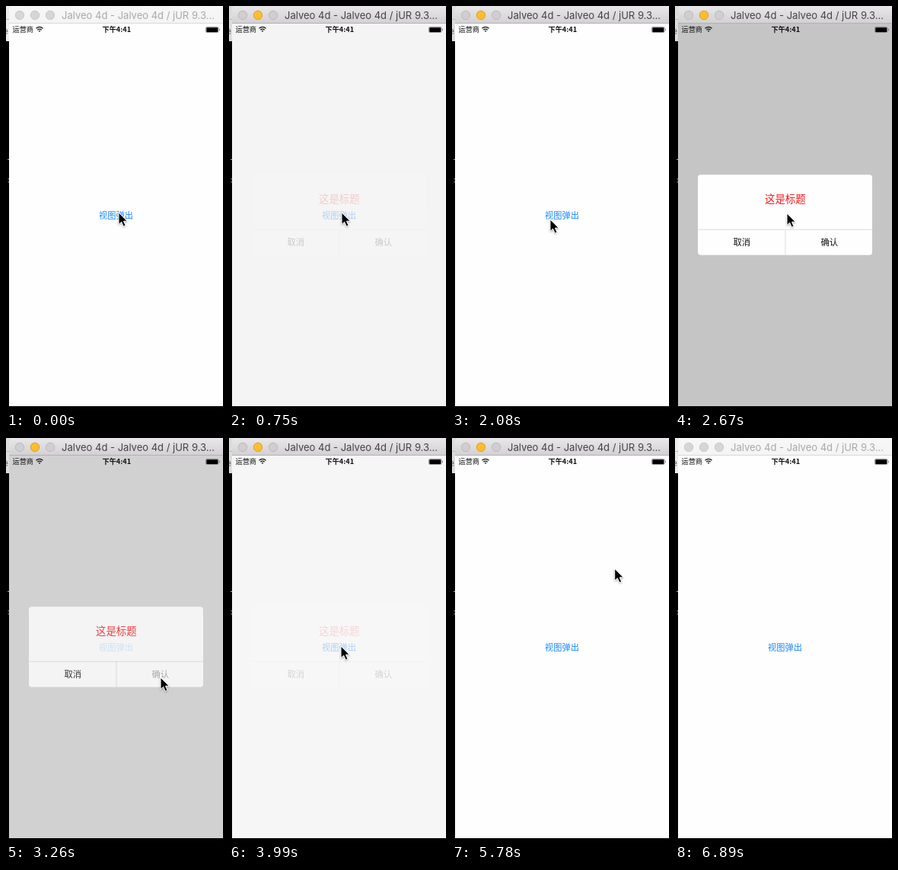
Write an HTML page that moves like this. It is 285 px wide and 528 px high and loops after 6.99 s.

```html
<!DOCTYPE html>
<html lang="zh-CN">
<head>
<meta charset="utf-8">
<title>Dialog demo</title>
<style>
  html, body { margin: 0; width: 100%; height: 100%; overflow: hidden; background: #000; }
  svg { display: block; width: 285px; height: 528px; }
  text { font-family: "Noto Sans CJK SC", "Noto Sans CJK", "Noto Sans", sans-serif; }
  .mid { text-anchor: middle; }
  .bar-title { font: 13px Inter, "Liberation Sans", sans-serif; }
  #win { --bar1: #f7f7f7; --bar2: #f4f4f4; --edge: #d9d9d9; --ink: #a9a9a9;
         --light: #d6d6d6; --ring: #c9c9c9; --mini: #d6d6d6; --mini-ring: #c9c9c9; --side: #ececec; }
  #win.active { --bar1: #e9e7e9; --bar2: #d2d0d2; --edge: #b4b2b4; --ink: #454345;
         --light: #d0ced0; --ring: #bbb9bb; --mini: #fdbd2e; --mini-ring: #e0a024; --side: #dcdcdc; }
  #top { stop-color: var(--bar1); }
  #bottom { stop-color: var(--bar2); }
  .lamp { fill: var(--light); stroke: var(--ring); }
  .mini { fill: var(--mini); stroke: var(--mini-ring); }
</style>
</head>
<body>
<svg viewBox="0 0 285 528">
  <filter id="soft" x="-50%" y="-50%" width="200%" height="200%">
    <feDropShadow dx="0" dy="1" stdDeviation=".8" flood-opacity=".35"/>
  </filter>

  <g id="win">
    <linearGradient id="bar" x2="0" y2="1">
      <stop id="top" offset="0"/>
      <stop id="bottom" offset="1"/>
    </linearGradient>
    <!-- window behind, showing at the left edge -->
    <rect width="285" height="528" fill="#000"/>
    <rect width="8" height="46" style="fill:var(--side)"/>
    <rect y="17" width="4" height="1" fill="#b8b8b8"/>
    <text class="bar-title" x="-4" y="37" fill="#666" style="font-size:12px">e</text>
    <path d="M2 200.5h2M2.5 226h1.5M2.5 230h1.5" stroke="#aaa"/>

    <path d="M4 23V4q0-4 4-4H285V23Z" fill="url(#bar)"/>
    <path d="M4 22.5H285" style="stroke:var(--edge)"/>
    <circle class="lamp" cx="18" cy="12" r="5.7"/>
    <circle class="lamp mini" cx="38" cy="12" r="5.7"/>
    <circle class="lamp" cx="58" cy="12" r="5.7"/>
    <text class="bar-title" x="73" y="17" style="fill:var(--ink)">Jalveo 4d - Jalveo 4d / jUR 9.3...</text>
  </g>

  <rect x="4" y="23" width="281" height="500" fill="#fefefe"/>
  <text id="open" class="mid" x="144.5" y="277.8" font-size="11.2" fill="#1787fb">视图弹出</text>
  <rect id="shade" x="4" y="23" width="281" height="500" fill="#000"/>

  <g id="dialog">
    <rect x="30" y="220.5" width="229" height="105" rx="4" fill="#fefefe"/>
    <path d="M30 292.2H259M145 292V325.5" stroke="#dcdcdc"/>
    <text class="mid" x="144.8" y="257.4" font-size="13.4" fill="#f5191d">这是标题</text>
    <text id="cancel" class="mid" x="87.7" y="313.4" font-size="11.3" fill="#111">取消</text>
    <text id="ok" class="mid" x="202.7" y="313.4" font-size="11.3" fill="#111">确认</text>
  </g>

  <!-- status bar -->
  <text x="8.5" y="34.2" font-size="9.2" fill="#111">运营商</text>
  <path d="M39.5 29.3q4.5-3.8 9 0M41.3 31.3q2.7-2.2 5.4 0" fill="none" stroke="#111" stroke-width="1.3"/>
  <path d="M42.7 32.6q1.3-1 2.6 0l-1.3 1.4Z" fill="#111"/>
  <text class="mid" x="145.3" y="34.2" font-size="9.2" font-weight="700" fill="#111">下午4:41</text>
  <rect x="262.5" y="27.5" width="16.5" height="7" rx="1.5" fill="none" stroke="#777" stroke-width=".8"/>
  <rect x="263.3" y="28.2" width="15" height="5.7" rx=".7" fill="#000"/>
  <path d="M280 29.5q1.4 1.5 0 3Z" fill="#222"/>

  <path id="cursor" d="M0 0V15.5L3.6 12.2L6.2 18L9 16.8L6.5 11.2H11.3Z"
        fill="#000" stroke="#fff" stroke-linejoin="round" filter="url(#soft)"/>
</svg>
<script>
const LOOP = 6990, FOCUS = 750, BLUR = 6890;
const STEP = 147.3;                          // screen refresh
const FADE = 400, TRAVEL = 420, DWELL = 250; // dialog fade, pointer trip, rest after a tap
const DIM = 0.4, SHADE = 0.222;

// pointer stops; those with an id are taps on that label
const stops = [
  { at: 640, x: 148, y: 270, id: "open" },
  { at: 1640, x: 79, y: 301, id: "cancel" },
  { at: 2140, x: 147, y: 271, id: "open" },
  { at: 3135, x: 203, y: 313, id: "ok" },
  { at: 3894, x: 147, y: 272, id: "open" },
  { at: 5106, x: 107, y: 305, id: "cancel" },
  { at: 5620, x: 213, y: 94 },
  { at: 6080, x: 216, y: 430 },
  { at: 6620, x: 298, y: 661 }
];
const taps = stops.filter(s => s.id);

const el = id => document.getElementById(id);
const [win, shade, dialog, cursor] = ["win", "shade", "dialog", "cursor"].map(el);
const clamp = v => Math.max(0, Math.min(1, v));
const smooth = p => p * p * (3 - 2 * p);

function pointerAt(t) {
  const i = stops.findIndex(s => s.at > t);
  const b = stops[i < 0 ? stops.length - 1 : i];
  const a = stops[i - 1] || b;
  const leave = Math.max(a.at + (a.id ? DWELL : 0), b.at - TRAVEL);
  const k = clamp((t - leave) / (b.at - leave));
  return [a.x + (b.x - a.x) * k, a.y + (b.y - a.y) * k];
}

function opacityAt(t) {
  const tap = taps.filter(s => s.at <= t).pop();
  const s = smooth(clamp((t - tap.at) / FADE));
  return tap.id === "open" ? s : 1 - s;
}

function draw(t) {
  const a = t < FOCUS - STEP / 2 ? 0 : opacityAt(t);
  shade.setAttribute("opacity", a * SHADE);
  dialog.setAttribute("opacity", a);
  for (const id of ["open", "cancel", "ok"]) {
    const held = t > 0 && taps.some(s => s.id === id && t > s.at - 60 && t < s.at + FADE + 40);
    el(id).setAttribute("opacity", held ? DIM : 1);
  }
  cursor.setAttribute("transform", `translate(${pointerAt(t)})`);
}

const begin = performance.now();
function frame() {
  const now = (performance.now() - begin) % LOOP;
  const start = FOCUS - 2;
  win.classList.toggle("active", now >= start && now < BLUR);
  draw(now < start ? 0 : start + Math.floor((now - start) / STEP) * STEP);
  requestAnimationFrame(frame);
}
frame();
</script>
</body>
</html>
```
